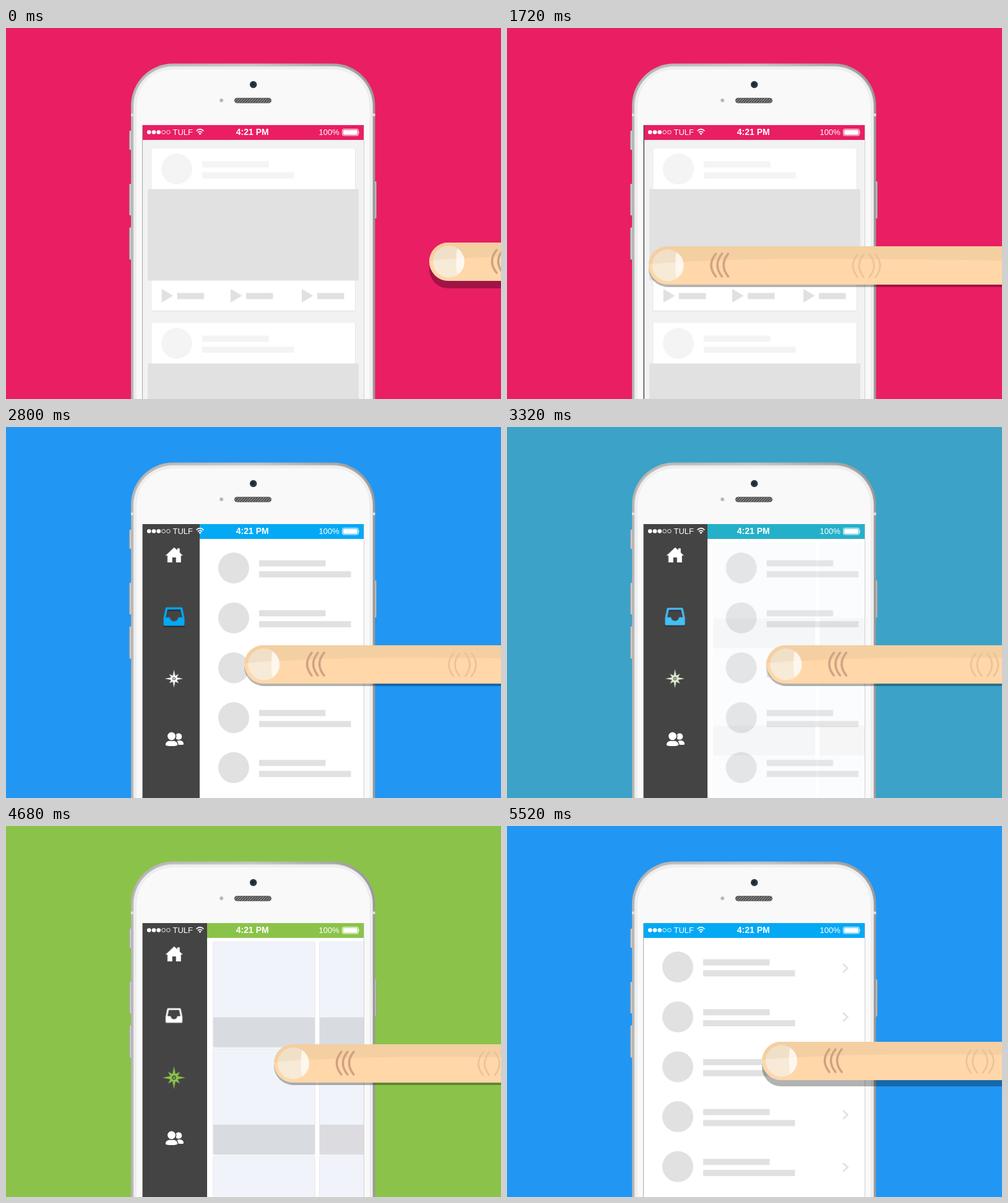
An HTML page for the animation above (6600 ms loop, 800 px wide and 600 px high).

```html
<!DOCTYPE html>
<html lang="en">
<head>
<meta charset="utf-8">
<title>Drag menu</title>
<style>
  html, body { margin: 0; width: 100%; height: 100%; overflow: hidden; background: #e91e63; }
  svg { display: block; width: 100vw; height: 100vh; }
  text { font: 13px "Liberation Sans", Arial, sans-serif; }
  .time { font-size: 14px; font-weight: bold; }

  .finger, .press, .shadow, .ripple, .page, .blue, .green, .home, .inbox, .compass, .inbox-shade {
    animation: 6600ms linear infinite;
  }
  .finger { animation-name: drag; }
  .press { animation-name: press; }
  .shadow { animation-name: shadow; }
  .ripple { animation-name: ripple; }
  .page { animation-name: slide; }
  .blue { animation-name: blue; }
  .green { animation-name: green; }
  .home { animation-name: home; }
  .inbox { animation-name: inbox; }
  .inbox-shade { animation-name: inbox-shade; }
  .compass { animation-name: compass; }

  @keyframes drag {
    0%, 3.636% { transform: translateX(684px); animation-timing-function: cubic-bezier(.333, 0, .667, 1); }
    19.091% { transform: translateX(227px); }
    25.455% { transform: translateX(227px); animation-timing-function: cubic-bezier(.333, 0, .667, .917); }
    34.545% { transform: translateX(352px); animation-timing-function: cubic-bezier(.333, .273, .667, .653); }
    42.424% { transform: translateX(385px); animation-timing-function: cubic-bezier(.333, .355, .667, .731); }
    57.576% { transform: translateX(447px); animation-timing-function: cubic-bezier(.333, .583, .667, 1); }
    62.879% { transform: translateX(457px); animation-timing-function: cubic-bezier(.333, 0, .667, .558); }
    70.909% { transform: translateX(433px); animation-timing-function: cubic-bezier(.333, .381, .667, 1); }
    76.97%, 100% { transform: translateX(412px); }
  }
  @keyframes slide {
    0% { transform: none; }
    25.455% { transform: translateX(0); animation-timing-function: cubic-bezier(.333, 0, .667, .931); }
    34.545% { transform: translateX(81px); animation-timing-function: cubic-bezier(.333, .441, .667, .685); }
    42.424% { transform: translateX(92px); animation-timing-function: cubic-bezier(.333, .333, .667, .7); }
    57.576% { transform: translateX(112px); animation-timing-function: cubic-bezier(.333, .6, .667, 1); }
    62.879% { transform: translateX(115.5px); animation-timing-function: cubic-bezier(.333, 0, .667, .539); }
    70.909% { transform: translateX(104px); animation-timing-function: cubic-bezier(.333, .364, .667, 1); }
    76.97% { transform: translateX(93px); animation-timing-function: cubic-bezier(.333, 0, .667, 1); }
    83.636%, 100% { transform: translateX(0); }
  }
  @keyframes press {
    0%, 17.273% { transform: translateY(0); animation-timing-function: ease-in-out; }
    20.303%, 76.97% { transform: translateY(6px); animation-timing-function: ease-in-out; }
    83.636%, 100% { transform: translateY(2px); }
  }
  @keyframes shadow {
    0%, 17.273% { transform: translateY(12px); animation-timing-function: ease-in-out; }
    20.303%, 76.97% { transform: translateY(3.5px); animation-timing-function: ease-in-out; }
    83.636%, 100% { transform: translateY(10px); }
  }
  @keyframes ripple {
    0%, 18.182% { transform: scale(0); opacity: .35; }
    21.818%, 100% { transform: scale(1); opacity: 0; }
  }
  @keyframes blue {
    0%, 38.182% { opacity: 0; }
    40.606%, 100% { opacity: 1; }
  }
  @keyframes green {
    0%, 49.697% { opacity: 0; }
    52.121%, 72.121% { opacity: 1; }
    74.545%, 100% { opacity: 0; }
  }
  @keyframes home {
    0%, 38.182% { transform: scale(1.28); fill: #e91e63; }
    40.606%, 100% { transform: scale(1); fill: #fff; }
  }
  @keyframes inbox {
    0%, 38.182% { transform: scale(1); fill: #fff; }
    40.606%, 49.697% { transform: scale(1.26); fill: #03a9f4; }
    52.121%, 72.121% { transform: scale(1); fill: #fff; }
    74.545%, 100% { transform: scale(1.26); fill: #03a9f4; }
  }
  @keyframes inbox-shade {
    0%, 38.182% { opacity: 0; }
    40.606%, 49.697% { opacity: 1; }
    52.121%, 72.121% { opacity: 0; }
    74.545%, 100% { opacity: 1; }
  }
  @keyframes compass {
    0%, 49.697% { transform: scale(1); fill: #fff; }
    52.121%, 72.121% { transform: scale(1.28); fill: #8bc34a; }
    74.545%, 100% { transform: scale(1); fill: #fff; }
  }
</style>
</head>
<body>
<svg viewBox="0 0 800 600">
  <defs>
    <clipPath id="screen"><rect x="221" y="157" width="357" height="443"/></clipPath>
    <linearGradient id="metal">
      <stop offset="0" stop-color="#b4b4b4"/><stop offset=".5" stop-color="#c4c4c4"/><stop offset="1" stop-color="#999"/>
    </linearGradient>
    <linearGradient id="button">
      <stop offset="0" stop-color="#999"/><stop offset=".5" stop-color="#d6d6d6"/><stop offset="1" stop-color="#8c8c8c"/>
    </linearGradient>
    <pattern id="mesh" width="3" height="3" patternUnits="userSpaceOnUse" patternTransform="rotate(45)">
      <rect width="3" height="3" fill="#4a4a4a"/><rect width="1" height="3" fill="#a5a5a5"/>
    </pattern>

    <g id="lines">
      <circle cx="276" cy="228" r="25"/>
      <rect x="317" y="215.5" width="107.5" height="10"/>
      <rect x="317" y="233.3" width="148.5" height="10"/>
    </g>
    <path id="chevron" d="M543 -7l7.5 7-7.5 7" fill="none" stroke="#e1e1e1" stroke-width="2.6"/>
    <g id="action">
      <path d="M0 422v22l18.5-11z"/>
      <rect x="25" y="428.5" width="43.5" height="10"/>
    </g>
    <g id="card">
      <rect x="234" y="194" width="331" height="264.5" rx="3" fill="#e7e7e7"/>
      <rect x="235" y="194.5" width="329" height="262.5" rx="2" fill="#fff"/>
      <use href="#lines" fill="#f4f4f4"/>
      <rect x="229" y="260.5" width="341" height="148" rx="2" fill="#e1e1e1"/>
      <g fill="#e1e1e1">
        <use href="#action" x="251.7"/><use href="#action" x="363"/><use href="#action" x="478"/>
      </g>
    </g>
    <g id="tile">
      <rect x="-1" y="-1" width="166" height="172.5" rx="3" fill="#e9ebee"/>
      <rect width="164" height="170" rx="2" fill="#f0f4fa"/>
      <path d="M0 122h164v46a2 2 0 0 1-2 2H2a2 2 0 0 1-2-2z"/>
    </g>
    <path id="tray" fill-rule="evenodd" d="M-9.5-11.8H9.5Q10.5-11.8 11-10.5L13.5 2V10.2Q13.5 11.8 12 11.8H-12Q-13.5 11.8-13.5 10.2V2L-11-10.5Q-10.5-11.8-9.5-11.8ZM-8.3-9L-10.5 1H-5.5Q-4.5 6 0 6T5.5 1H10.5L8.3-9Z"/>
    <path id="fingerShape" d="M31 0H760V62H31A31 31 0 0 1 31 0Z"/>
    <clipPath id="fingerClip"><use href="#fingerShape"/></clipPath>
    <clipPath id="nailClip"><circle cx="31.5" cy="31" r="25.5"/></clipPath>
    <path id="crease" d="M9 0Q-6 18.5 9 37" fill="none" stroke-linecap="round"/>
  </defs>

  <rect width="800" height="600" fill="#e91e63"/>
  <rect class="blue" width="800" height="600" fill="#2196f3"/>
  <rect class="green" width="800" height="600" fill="#8bc34a"/>

  <!-- phone -->
  <g fill="url(#button)">
    <rect x="199" y="166" width="5" height="31" rx="1.5"/>
    <rect x="199" y="252" width="5" height="51" rx="1.5"/>
    <rect x="199" y="322.500" width="5" height="52" rx="1.5"/>
    <rect x="594" y="248" width="5" height="60" rx="1.5"/>
  </g>
  <rect x="202" y="57.500" width="394.500" height="700" rx="68" fill="url(#metal)"/>
  <path d="M202 140.500h5M591.500 140.500h5" stroke="#e6e6e6" stroke-width="4"/>
  <rect x="205.500" y="61.500" width="387.500" height="700" rx="65" fill="#dedede"/>
  <rect x="207" y="63" width="384.500" height="700" rx="63" fill="#f1f1f1"/>
  <rect x="210" y="66" width="378.500" height="700" rx="60" fill="#f9f9f9" stroke="#e6e6e6"/>
  <circle cx="399.700" cy="91.500" r="5.700" fill="#2b3840"/>
  <circle cx="399" cy="91" r="2.300" fill="#18222a"/>
  <circle cx="348.200" cy="117" r="3" fill="#b9b9b9"/>
  <rect x="368.500" y="112.500" width="61" height="9.500" rx="4.700" fill="#dadada"/>
  <rect x="369.500" y="113.500" width="59" height="7.500" rx="3.700" fill="url(#mesh)" stroke="#555" stroke-width=".8"/>
  <path d="M220.500 157V600M578 157V600" stroke="#a8a8a8"/>

  <g clip-path="url(#screen)">
    <!-- menu -->
    <rect x="221" y="157" width="357" height="443" fill="#444"/>
    <g fill="#fff">
      <g transform="translate(271.7 207)">
        <path class="home" d="M-14 1L0-12.300 5-7.700V-10.700H9V-4L14 1H11V12H3V4H-3V12H-10.800V1Z"/>
      </g>
      <g transform="translate(271.500 306.500)">
        <g class="inbox">
          <use class="inbox-shade" href="#tray" y="1.800" fill="#2c2c2c"/>
          <use href="#tray"/>
        </g>
      </g>
      <g transform="translate(271.500 407)">
        <g class="compass">
          <path d="M0-14.500L1.900-4.600 7.400-7.400 4.600-1.900 14.500 0 4.600 1.900 7.400 7.400 1.900 4.600 0 14.500-1.900 4.600-7.400 7.400-4.600 1.900-14.500 0-4.600-1.900-7.400-7.400-1.900-4.600Z"/>
          <circle r="2" fill="none" stroke="#444" stroke-width="1.200"/>
        </g>
      </g>
      <g transform="translate(272 505)">
        <circle cx="7" cy="-4.500" r="5.300"/>
        <path d="M2 9Q2 2 8 2Q15 2 15 7.500Q15 9 13 9Z"/>
        <g stroke="#444" stroke-width="1.500">
          <path d="M-15 9Q-15 1.500-4.500 1.500T6 9Q6 11.800-4.500 11.800T-15 9Z"/>
          <circle cx="-4.500" cy="-5" r="7.200"/>
        </g>
      </g>
    </g>

    <!-- sliding pages -->
    <g class="page">
      <g>
        <rect x="221" y="157" width="357" height="443" fill="#f2f2f2"/>
        <rect x="221" y="157" width="357" height="24" fill="#e91e63"/>
        <use href="#card"/><use href="#card" y="282"/>
      </g>
      <g class="blue">
        <rect x="221" y="157" width="357" height="443" fill="#fff"/>
        <rect x="221" y="157" width="357" height="24" fill="#03a9f4"/>
        <g fill="#e1e1e1">
          <use href="#lines"/><use href="#lines" y="80.700"/><use href="#lines" y="161.400"/>
          <use href="#lines" y="242.100"/><use href="#lines" y="322.800"/>
        </g>
        <use href="#chevron" y="230"/><use href="#chevron" y="309"/><use href="#chevron" y="388"/>
        <use href="#chevron" y="467"/><use href="#chevron" y="552"/>
      </g>
      <g class="green">
        <rect x="221" y="157" width="357" height="443" fill="#fff"/>
        <rect x="221" y="157" width="357" height="24" fill="#8bc34a"/>
        <g fill="#d8dce1">
          <use href="#tile" x="231" y="187.500"/><use href="#tile" x="403" y="187.500"/>
          <use href="#tile" x="231" y="361"/><use href="#tile" x="403" y="361" fill="#dcdbe0"/>
          <use href="#tile" x="231" y="534.500"/><use href="#tile" x="403" y="534.500"/>
        </g>
      </g>
    </g>

    <!-- status bar -->
    <g fill="#fff">
      <circle cx="231.200" cy="168.500" r="3.300"/><circle cx="239" cy="168.500" r="3.300"/><circle cx="246.700" cy="168.500" r="3.300"/>
      <g fill="none" stroke="#fff">
        <circle cx="254.600" cy="168.500" r="2.900" stroke-width=".9"/><circle cx="262.400" cy="168.500" r="2.900" stroke-width=".9"/>
        <path d="M307.500 166.500Q313.500 160.800 319.500 166.500M310 169Q313.500 165.800 317 169" stroke-width="1.700"/>
        <rect x="543.500" y="163.500" width="26" height="10.500" rx="2" stroke-width=".9"/>
      </g>
      <path d="M311.300 170.700Q313.500 168.800 315.700 170.700L313.500 173Z"/>
      <rect x="544.800" y="164.800" width="23.400" height="7.900" rx="1"/>
      <path d="M570.200 167q1.600 1.700 0 3.500z"/>
      <text x="269.500" y="173">TULF</text>
      <text class="time" x="398.300" y="173" text-anchor="middle">4:21 PM</text>
      <text x="505.500" y="173">100%</text>
    </g>
  </g>

  <g transform="translate(257.500 377.500)"><circle class="ripple" r="127" fill="#fff"/></g>

  <!-- finger -->
  <g transform="translate(0 347)">
    <g class="finger">
      <g class="press">
        <g class="shadow"><use href="#fingerShape" opacity=".3"/></g>
        <use href="#fingerShape" fill="#ffd7a9"/>
        <path clip-path="url(#fingerClip)" d="M0 0H760V28Q560 22 420 21T200 20.500Q90 22 0 29Z" fill="#f4cfa1"/>
        <g clip-path="url(#nailClip)">
          <rect width="62" height="62" fill="#f7ead6"/>
          <path d="M0 0H62V25Q30 26 0 29Z" fill="#f0e0c8"/>
          <path d="M47 0Q40 31 47 62H62V0Z" fill="#fffaf2" opacity=".85"/>
        </g>
        <g stroke="#cfa083" stroke-width="3.400">
          <use href="#crease" x="100" y="12"/><use href="#crease" x="110" y="12"/><use href="#crease" x="120" y="12"/>
        </g>
        <g stroke="#e9c199" stroke-width="2.400">
          <use href="#crease" x="329" y="13"/><use href="#crease" x="339" y="13"/>
          <g transform="scale(-1 1)"><use href="#crease" x="-366" y="13"/><use href="#crease" x="-376" y="13"/></g>
        </g>
      </g>
    </g>
  </g>
</svg>
</body>
</html>
```
